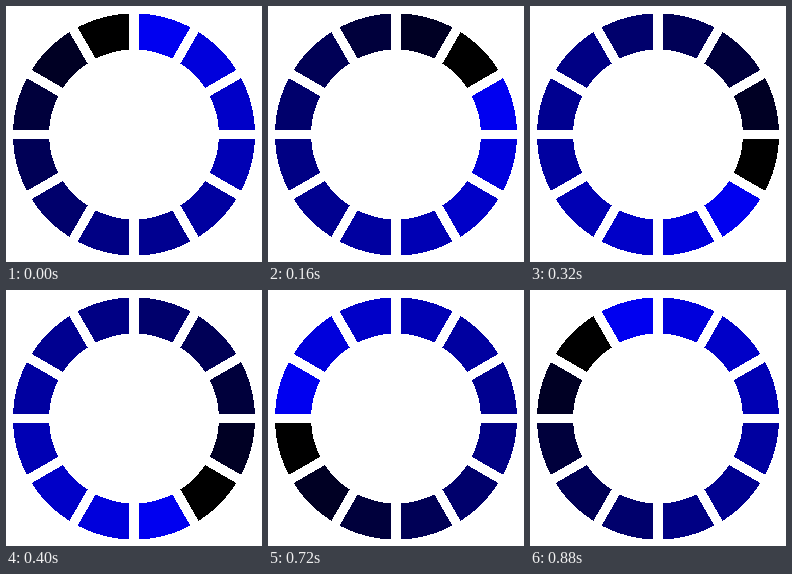
An HTML page that plays this animation: 256x256 px, repeating every 960 ms.

```html
<!DOCTYPE html>
<html lang="en">
<head>
<meta charset="utf-8">
<title>Ring spinner</title>
<style>
  html, body { margin: 0; height: 100%; overflow: hidden; background: #fff; }
  svg { display: block; width: 100vw; height: 100vh; }
</style>
</head>
<body>
<svg viewBox="0 0 256 256" shape-rendering="crispEdges">
  <g id="ring" transform="translate(128 128.5)" fill="none"></g>
</svg>
<script>
const COUNT = 12, STEP_MS = 80, RADIUS = 103, THICKNESS = 36, GAP = 9.5;
// Blue levels, clockwise from the brightest segment
const SHADES = [240, 220, 200, 180, 160, 144, 132, 108, 86, 60, 36, 0];
const ring = document.getElementById('ring');

function addPath(d, width, stroke) {
  const path = document.createElementNS('http://www.w3.org/2000/svg', 'path');
  path.setAttribute('d', d);
  path.setAttribute('stroke-width', width);
  path.setAttribute('stroke', stroke);
  return ring.appendChild(path);
}

function point(index, radius) {
  const angle = index * 2 * Math.PI / COUNT;
  return `${radius * Math.sin(angle)} ${-radius * Math.cos(angle)}`;
}

const segments = SHADES.map((_, i) => addPath(
  `M${point(i, RADIUS)}A${RADIUS} ${RADIUS} 0 0 1 ${point(i + 1, RADIUS)}`, THICKNESS, '#000'));

// Parallel-sided gaps between the segments
for (let i = 0; i < COUNT / 2; i++) {
  addPath(`M${point(i, 125)}L${point(i, -125)}`, GAP, '#fff');
}

function draw(now) {
  const step = Math.floor(now / STEP_MS) % COUNT;
  segments.forEach((segment, i) => {
    const shade = SHADES[(i - step + COUNT) % COUNT];
    segment.setAttribute('stroke', `rgb(0,0,${shade})`);
  });
}

const start = performance.now();
function tick() {
  draw(performance.now() - start);
  requestAnimationFrame(tick);
}
tick();
</script>
</body>
</html>
```
